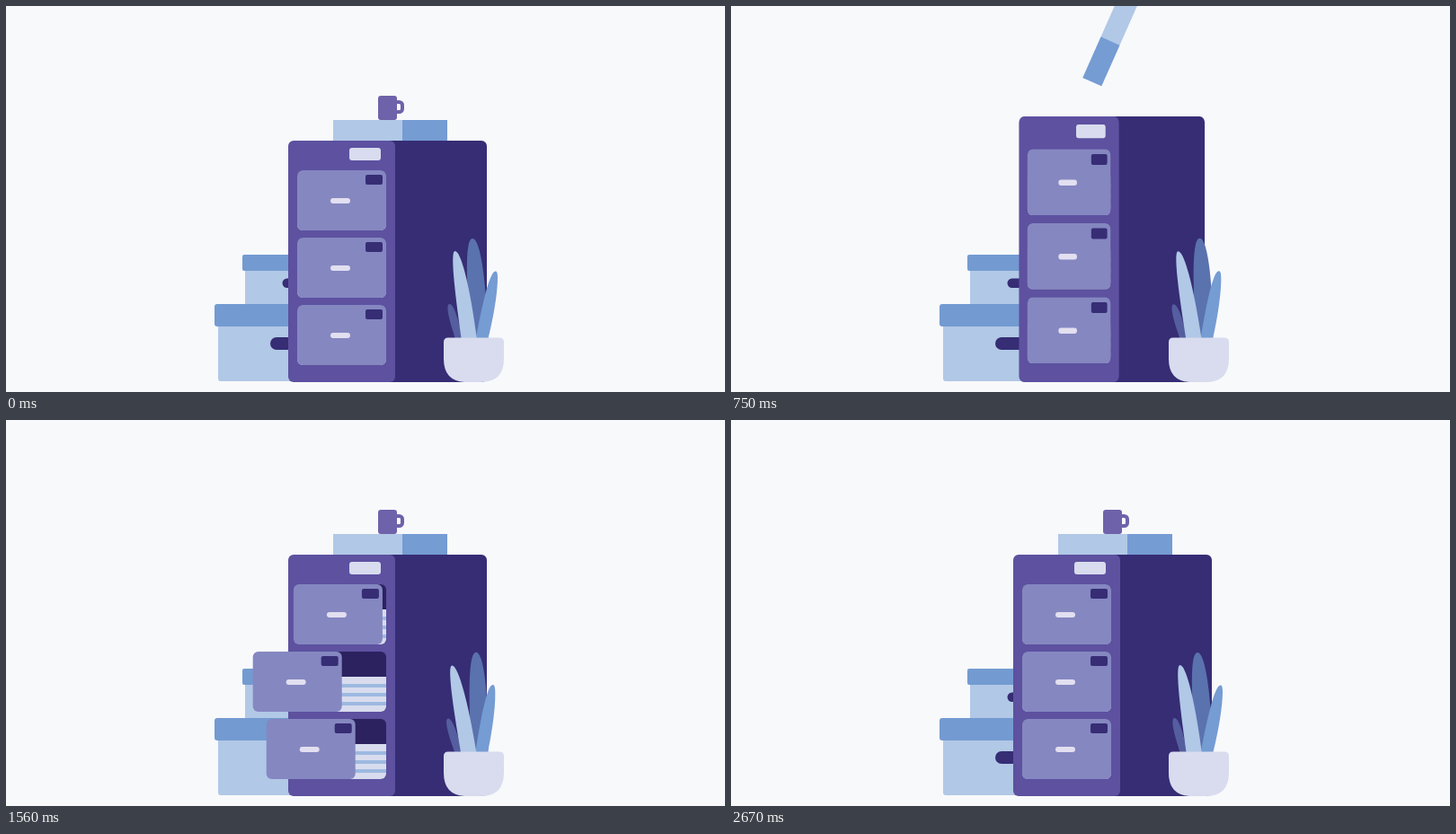
Write an HTML page that moves like this. It is 800x430 px and loops after 2.73 s.

```html
<!DOCTYPE html>
<html lang="en">
<head>
<meta charset="utf-8">
<title>Filing cabinet</title>
<style>
  html, body { margin: 0; width: 100%; height: 100%; overflow: hidden; background: #f8f9fb; }
  svg { display: block; width: 800px; height: 430px; }
</style>
</head>
<body>
<svg viewBox="0 0 800 430">
  <defs>
    <clipPath id="slot"><rect x="324" y="183" width="99" height="67" rx="6"/></clipPath>
    <g id="inside" clip-path="url(#slot)">
      <rect x="324" y="183" width="99" height="67" fill="#2c2260"/>
      <rect x="324" y="211" width="99" height="39" fill="#d8dcee"/>
      <path d="M324 221h99M324 231h99M324 241h99" stroke="#9db9e0" stroke-width="4"/>
    </g>
    <g id="drawer">
      <rect x="324" y="183" width="99" height="67" rx="6" fill="#8587c1"/>
      <rect x="400" y="188" width="19" height="11" rx="2" fill="#362d75"/>
      <rect x="361" y="214" width="22" height="6" rx="3" fill="#e2dff0"/>
    </g>
  </defs>

  <g id="boxes">
    <rect x="266" y="290" width="90" height="45" fill="#b1c8e6"/>
    <rect x="263" y="277" width="96" height="18" rx="2" fill="#739bd1"/>
    <rect x="307.5" y="303.5" width="30" height="10.5" rx="5.2" fill="#362d75"/>
    <rect x="236" y="350" width="130" height="68" rx="3" fill="#b1c8e6"/>
    <rect x="232" y="332" width="138" height="25" rx="3" fill="#739bd1"/>
    <rect x="294" y="369" width="44" height="14" rx="7" fill="#362d75"/>
  </g>

  <g id="mug">
    <rect x="428" y="107" width="13" height="11" rx="3.5" fill="none" stroke="#6e62aa" stroke-width="4"/>
    <rect x="414" y="100" width="21" height="27" rx="3" fill="#6e62aa"/>
  </g>
  <g id="books">
    <rect x="364" y="127" width="77.5" height="23" fill="#b1c8e6"/>
    <rect x="441" y="127" width="50" height="23" fill="#759cd3"/>
  </g>

  <g id="cabinet">
    <rect x="420" y="150" width="115" height="269" rx="6" fill="#362d75"/>
    <rect x="314" y="150" width="119" height="269" rx="6" fill="#5d51a0"/>
    <rect x="382" y="158" width="35" height="14" rx="3" fill="#d8dcee"/>
    <use href="#inside"/>
    <use href="#inside" y="75"/>
    <use href="#inside" y="150"/>
    <use href="#drawer" class="drawer"/>
    <use href="#drawer" class="drawer" y="75"/>
    <use href="#drawer" class="drawer" y="150"/>
  </g>

  <g id="plant">
    <path class="leaf" fill="#555e9f" d="M493.5 332C489.500 332 491 345 501 374L510 380C505 355 499 332 493.500 332Z"/>
    <path class="leaf" fill="#5a72ae" d="M519 259C511 259 511 300 518 380L536 380C536 330 530 259 519 259Z"/>
    <path class="leaf" fill="#759cd3" d="M544.500 295.500C538 295.500 529 335 521 380L534 380C542 350 547 320 547 303C547 298 546.500 295.500 544.500 295.500Z"/>
    <path class="leaf" fill="#b1c8e6" d="M499.500 273C495 273 497 305 508 380L525 380C519 330 508 273 499.500 273Z"/>
    <path fill="#d8dcee" d="M492 369.500H549Q554 369.500 554 374.500V393Q554 419 528 419H513Q487 419 487 393V374.500Q487 369.500 492 369.500Z"/>
  </g>
</svg>
<script>
  const STEP = 30, LOOP = 2730, LAST = 89;
  const $ = id => document.getElementById(id);
  const drawers = [...document.querySelectorAll('.drawer')];
  const leaves = [...document.querySelectorAll('.leaf')];

  // Symmetric ease-in-out, cubic-bezier(.42, 0, .58, 1)
  function ease(x) {
    let lo = 0, hi = 1, u = 0.5;
    for (let i = 0; i < 24; i++) {
      u = (lo + hi) / 2;
      const v = 1 - u;
      if (1.26 * u * v * v + 1.74 * u * u * v + u * u * u < x) lo = u; else hi = u;
    }
    return u * u * (3 - 2 * u);
  }

  // Eased value from a list of [step, value] keys
  function track(keys, n) {
    if (n <= keys[0][0]) return keys[0][1];
    for (let i = 1; i < keys.length; i++) {
      const [a, from] = keys[i - 1], [b, to] = keys[i];
      if (n <= b) return from + (to - from) * ease((n - a) / (b - a));
    }
    return keys[keys.length - 1][1];
  }

  const scaleX = [[0, 1], [15, 1.12], [25, 0.935], [30, 1]];
  const scaleY = [[0, 1], [15, 0.84], [25, 1.1], [30, 1]];
  const shift = [[0, 0], [15, -1], [25, -1.3], [30, 0]];
  const slide = [
    [[30, 0], [42, -50], [54.5, 0]],
    [[30, 0], [54, -50], [66, 0]],
    [[30, 0], [66, -50], [78, 0]]
  ];
  const sway = [[0, 0], [45, 1], [90, 0]];
  // Turn in degrees and pivot of each leaf
  const bend = [[-2, 505, 380], [1.9, 527, 385], [-2, 528, 385], [-1.8, 516, 385]];

  // Things on top ride the cabinet unless their throw carries them higher
  const toss = [
    { el: $('mug'), apex: -295, mid: 31.2, pull: 1.28, x: 426, y: 113.5, spin: [[12, 0], [46, 360]] },
    { el: $('books'), apex: -114, mid: 26.2, pull: 1.5, x: 427.5, y: 138.5, spin: [[17, 0], [37.5, 360]] }
  ];

  const set = (el, t) => el.setAttribute('transform', t);

  function draw(n) {
    const sy = track(scaleY, n);
    set($('cabinet'), `translate(${433 + track(shift, n)} 419) scale(${track(scaleX, n)} ${sy}) translate(-433 -419)`);
    drawers.forEach((el, i) => set(el, `translate(${track(slide[i], n)} 0)`));

    const top = 269 * (1 - sy);
    for (const o of toss) {
      const dy = Math.min(top, o.apex + o.pull * (n - o.mid) ** 2);
      set(o.el, `translate(0 ${dy}) rotate(${track(o.spin, n)} ${o.x} ${o.y})`);
    }

    const s = track(sway, n);
    leaves.forEach((el, i) => {
      const [deg, x, y] = bend[i];
      set(el, `rotate(${deg * s} ${x} ${y})`);
    });
  }

  const start = performance.now();
  function tick() {
    const t = (performance.now() - start) % LOOP;
    draw(Math.min(LAST, Math.floor(t / STEP)));
    requestAnimationFrame(tick);
  }
  tick();
</script>
</body>
</html>
```
